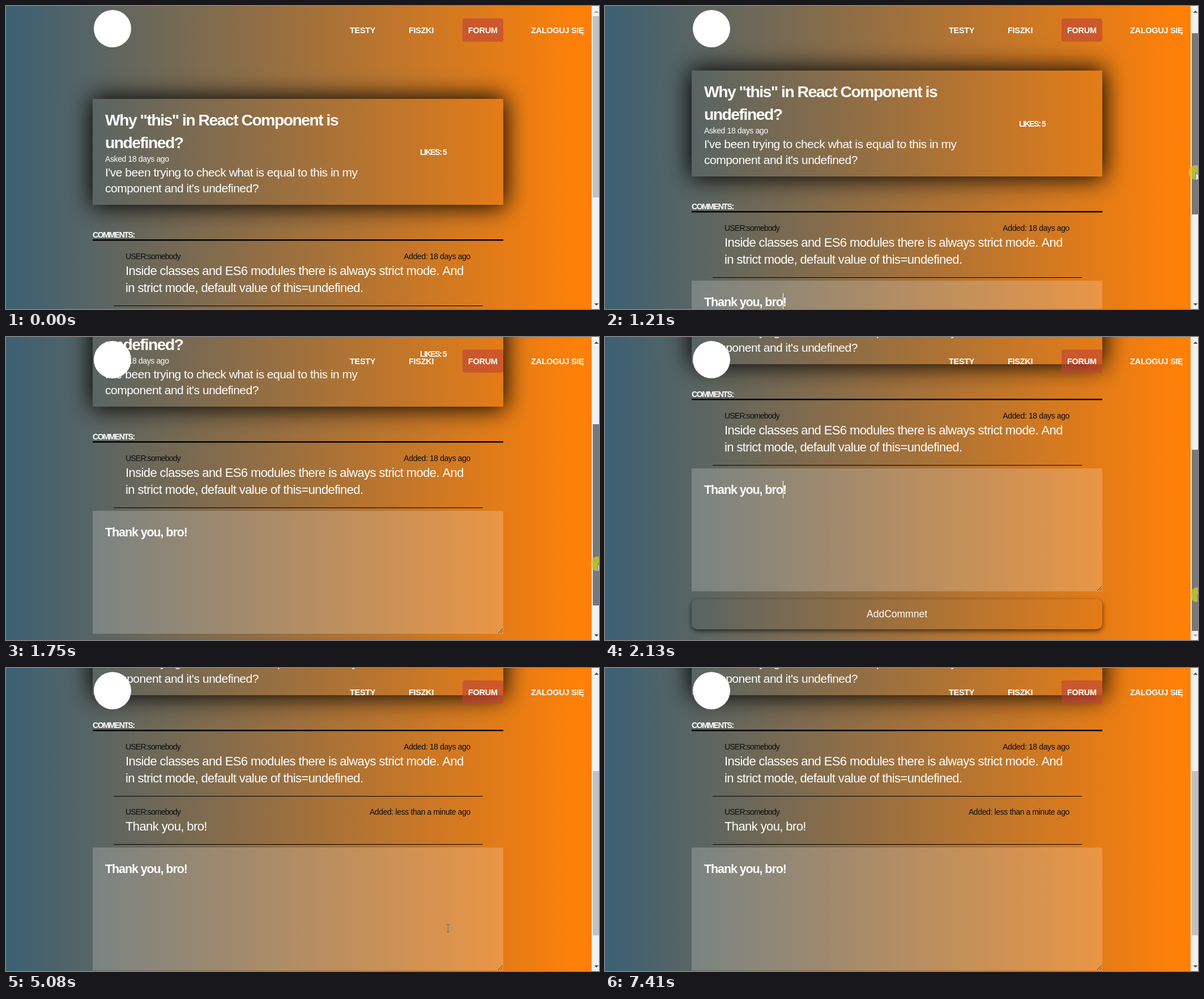
Animation of 1047x535 px, one loop 8.19 s. Source, as an HTML page with a canvas:

```html
<!DOCTYPE html>
<html lang="en">
<head>
<meta charset="utf-8">
<title>Forum thread</title>
<style>
  html, body { margin: 0; width: 100%; height: 100%; overflow: hidden; }
  canvas { display: block; }
</style>
</head>
<body>
<canvas id="stage" width="1047" height="535"></canvas>
<script>
const W = 1047, H = 535, PAGE_W = 1034;
const LEFT = 153, COLUMN = 725, FORM_H = 217, BUTTON_DY = 231, BUTTON_H = 53;
const LOOP = 8190, TICK = 76.6, DRAG_START = 1060, THUMB_GRAB_Y = 264;
const PRESS = 810, RELEASE = 2290, HOVER = 3150, CLICK = 3930, POSTED = 4150;
const ctx = document.getElementById('stage').getContext('2d');

const STYLES = {
  title: { weight: 'bold', size: 28.3, spacing: -1.5 },
  body: { size: 21, spacing: -0.5 },
  label: { weight: 'bold', size: 14, spacing: -1.4 },
  meta: { size: 14, spacing: -0.38 },
  comment: { size: 22, spacing: -0.6 },
  input: { weight: 'bold', size: 21.5, spacing: -1.1 },
  nav: { weight: 'bold', size: 14.5, spacing: -0.3 },
  button: { size: 17.5, spacing: 0 }
};
const THREAD = [
  { age: '18 days', lines: ['Inside classes and ES6 modules there is always strict mode. And',
    'in strict mode, default value of this=undefined.'] },
  { age: 'less than a minute', lines: ['Thank you, bro!'] }
];
// Pointer path: where each glide leads, and when
const POINTER_START = { x: 983, y: 460 };
const GLIDES = [
  { x: 1043, y: THUMB_GRAB_Y, from: 70, to: 660 },
  { x: 1045, y: 400.5, from: 980, to: 1750 },
  { x: 1046, y: 455, from: 1910, to: 2130 },
  { x: 874, y: 453, from: 2520, to: 2750 },
  { x: 778, y: 478, from: 2980, to: 3600 },
  { x: 780, y: 459, from: 4960, to: 5040 },
  { x: 768, y: 299, from: 5060, to: 5850 },
  { x: 895, y: 443, from: 5890, to: 6640 },
  { x: 1003, y: 550, from: 6900, to: 7410 }
];

const clamp = (v, lo, hi) => Math.min(hi, Math.max(lo, v));
const progress = (t, from, to) => clamp((t - from) / (to - from), 0, 1);
const smooth = u => u * u * (3 - 2 * u);

// The screen refreshes about thirteen times a second
const refreshTime = t => DRAG_START + Math.floor((t - DRAG_START) / TICK + 0.1) * TICK;

function pointerAt(t) {
  let { x, y } = POINTER_START;
  for (const g of GLIDES) {
    const k = smooth(progress(t, g.from, g.to));
    x += (g.x - x) * k;
    y += (g.y - y) * k;
  }
  return { x, y };
}

// The page follows the dragged thumb and keeps its place after release
function scrollAt(t) {
  const dragged = pointerAt(clamp(t, 700, RELEASE)).y - THUMB_GRAB_Y;
  return t < PRESS ? 0 : Math.round(clamp(dragged * 838 / 501, 0, 303));
}

function rect(x, y, w, h, color) {
  ctx.fillStyle = color;
  ctx.fillRect(x, y, w, h);
}

function rounded(x, y, w, h, r, color) {
  ctx.fillStyle = color;
  ctx.beginPath();
  ctx.roundRect(x, y, w, h, r);
  ctx.fill();
}

function disc(x, y, r, color) {
  rounded(x - r, y - r, 2 * r, 2 * r, r, color);
}

function text(str, x, y, style, { color = '#fff', align = 'left', spacing = style.spacing } = {}) {
  ctx.font = `${style.weight || 'normal'} ${style.size}px "Liberation Sans", sans-serif`;
  ctx.letterSpacing = spacing + 'px';
  ctx.textAlign = align;
  ctx.fillStyle = color;
  ctx.fillText(str, x, y);
}

function sideGradient(x0, x1, left, right) {
  const g = ctx.createLinearGradient(x0, 0, x1, 0);
  g.addColorStop(0, left);
  g.addColorStop(1, right);
  return g;
}

// Paints only the part of the shadow outside the box; the caster sits off stage
function outerShadow(y, h, r, { blur, dy = 0, spread = 0, color }) {
  const away = 3000;
  ctx.save();
  ctx.beginPath();
  ctx.rect(0, -H, PAGE_W, 4 * H);
  ctx.roundRect(LEFT, y, COLUMN, h, r);
  ctx.clip('evenodd');
  Object.assign(ctx, { shadowColor: color, shadowBlur: blur, shadowOffsetX: away, shadowOffsetY: dy });
  rounded(LEFT - spread - away, y - spread, COLUMN + 2 * spread, h + 2 * spread, r, '#000');
  ctx.restore();
}

function drawQuestion() {
  const x = 175;
  outerShadow(164, 187, 0, { blur: 40, spread: 3, color: '#000' });
  text('Why "this" in React Component is', x, 211, STYLES.title);
  text('undefined?', x, 251, STYLES.title);
  text('Asked 18 days ago', x, 275, STYLES.meta);
  text("I've been trying to check what is equal to this in my", x, 301, STYLES.body);
  text("component and it's undefined?", x, 329, STYLES.body);
  text('LIKES: 5', 731, 263, STYLES.label);
}

// Returns the bottom of the list
function drawComments(comments) {
  let y = 414;
  text('COMMENTS:', LEFT, y - 5, STYLES.label);
  rect(LEFT, y - 2, COLUMN, 2.5, '#000');
  for (const { age, lines } of comments) {
    text('USER:somebody', 211, y + 33, STYLES.meta, { color: '#0c0c0c', spacing: -0.8 });
    text(`Added: ${age} ago`, 820, y + 33, STYLES.meta, { color: '#0c0c0c', align: 'right' });
    lines.forEach((line, i) => text(line, 211, y + 61 + 30 * i, STYLES.comment));
    y += 55 + 30 * lines.length;
    rect(190, y, 652, 1, '#000');
  }
  return y;
}

function drawForm(top, caret, hover) {
  rect(LEFT, top, COLUMN, FORM_H, 'rgba(255,255,255,.2)');
  text('Thank you, bro!', 175, top + 45, STYLES.input);
  if (caret) rect(314, top + 22, 1, 31, '#fff');
  ctx.strokeStyle = '#4a4033';
  ctx.lineWidth = 1;
  ctx.beginPath();
  for (const d of [8, 4]) {
    ctx.moveTo(877 - d, top + 216);
    ctx.lineTo(877, top + 216 - d);
  }
  ctx.stroke();

  const y = top + BUTTON_DY;
  outerShadow(y, BUTTON_H, 10, { blur: 8, dy: 3, color: `rgba(0,0,0,${0.65 * (1 - hover)})` });
  outerShadow(y, BUTTON_H, 10, { blur: 8, dy: 3, color: `rgba(255,255,255,${hover})` });
  ctx.globalAlpha = hover;
  rounded(LEFT, y, COLUMN, BUTTON_H, 10, sideGradient(180, 850, '#f55e43', '#3d6073'));
  ctx.globalAlpha = 1;
  text('AddCommnet', 515.5, y + 32, STYLES.button, { align: 'center' });
}

function drawHeader() {
  const items = { TESTY: 607, FISZKI: 711, FORUM: 816, 'ZALOGUJ SIĘ': 927 };
  disc(188, 40, 33, '#fff');
  rounded(806, 22, 72, 41, 4, 'rgba(192,65,56,.6)');
  for (const label in items) text(label, items[label], 48, STYLES.nav);
}

function scrollArrow(y, dir, enabled) {
  ctx.fillStyle = enabled ? '#505050' : '#a3a3a3';
  ctx.beginPath();
  ctx.moveTo(1038.5, y);
  ctx.lineTo(1046.5, y);
  ctx.lineTo(1042.5, y + 4 * dir);
  ctx.fill();
}

function drawScrollbar(t, scroll, pageHeight) {
  const track = 501;
  const dragging = t >= PRESS && t < RELEASE, hovered = t >= 580 && t < 2600;
  rect(PAGE_W, 0, W - PAGE_W, H, '#f1f1f1');
  rect(1036, Math.round(18 + scroll / pageHeight * track), 11, Math.round(H / pageHeight * track),
    dragging ? '#787878' : hovered ? '#a8a8a8' : '#c1c1c1');
  scrollArrow(12, -1, scroll > 0);
  scrollArrow(525, 1, scroll < pageHeight - H);
}

function outlined(path) {
  ctx.fillStyle = '#fff';
  ctx.strokeStyle = '#000';
  ctx.lineWidth = 1;
  const shape = new Path2D(path);
  ctx.stroke(shape);
  ctx.fill(shape);
}

const CURSORS = {
  arrow: () => outlined('M0 0V14L3 11L5 16H7L5 10H9Z'),
  hand: () => outlined('M-1 1H2V7L9 9V15L7 19H1L-3 11H-1Z'),
  beam() {
    const color = '#43729c';
    rect(-0.5, -7, 1, 14, color);
    rect(-3, -7, 6, 1, color);
    rect(-3, 6, 6, 1, color);
  }
};

function drawPointer(t, { x, y }, formTop) {
  const inside = (top, h) => x > LEFT && x < LEFT + COLUMN && y >= top && y < top + h;
  const kind = inside(formTop, FORM_H) ? 'beam'
    : inside(formTop + BUTTON_DY, BUTTON_H) ? 'hand' : 'arrow';
  const pressed = (t >= PRESS && t < RELEASE) || (t >= CLICK && t < POSTED);
  if (pressed) disc(x, y, 13, 'rgba(204,204,40,.76)');
  ctx.save();
  ctx.translate(Math.round(x) + 0.5, Math.round(y) + 0.5);
  CURSORS[kind]();
  ctx.restore();
}

function draw(t) {
  const shown = refreshTime(t), scroll = scrollAt(shown), posted = t >= POSTED;
  const caret = t < 3360 && Math.floor((t - DRAG_START) / 460) % 2 === 0;
  const hover = posted ? 0 : smooth(progress(shown, HOVER, HOVER + 300));

  rect(0, 0, PAGE_W, H, sideGradient(10, 1015, '#3d6073', '#ff8008'));
  ctx.save();
  ctx.translate(0, -scroll);
  drawQuestion();
  const formTop = drawComments(posted ? THREAD : THREAD.slice(0, 1)) + 6;
  drawForm(formTop, caret, hover);
  ctx.restore();
  drawHeader();
  drawScrollbar(t, scroll, formTop + 303);
  if (t >= 70) drawPointer(t, pointerAt(shown), formTop - scroll);
}

const start = performance.now();
function frame() {
  draw((performance.now() - start) % LOOP);
  requestAnimationFrame(frame);
}
frame();
</script>
</body>
</html>
```
